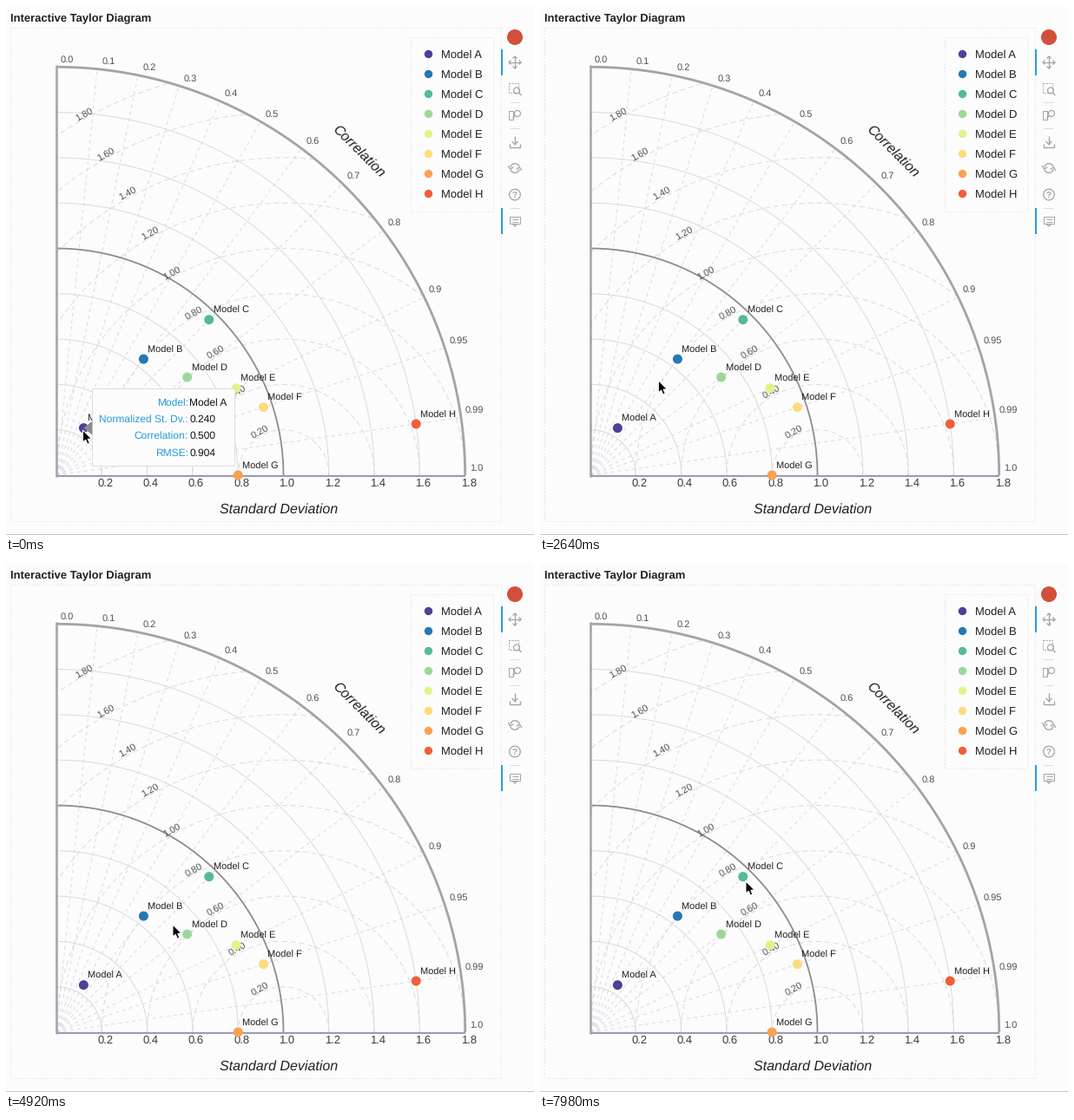
Write a matplotlib script that moves like this. It is 608x610 px and loops after 8000 ms.

```python
import numpy as np
import matplotlib.pyplot as plt
from matplotlib.animation import FuncAnimation
from matplotlib.patches import Circle, Polygon, Rectangle

W, H, DPI = 608, 610, 64
LOOP, STEP = 8000, 40
PX = 72 / DPI                      # points per pixel
X0, Y0, UNIT, RMAX = 58, 541, 261.5, 1.8
PAPER, INK, SOFT = "#fcfcfc", "#202020", "#505052"
AXIS, GRID, DASH = "#a3a3aa", "#dcdcd4", "#dadae8"
BORDER, BLUE, ICON = "#e6e6ec", "#2a9ad8", "#a3a6a8"

DEVIATIONS = (0.24, 0.64, 0.96, 0.72, 0.88, 0.96, 0.80, 1.60)
CORRELATIONS = (0.50, 0.60, 0.70, 0.80, 0.90, 0.95, 1.00, 0.99)

plt.rcParams.update({"font.family": "Liberation Sans", "text.hinting": "none",
                     "toolbar": "None"})
fig = plt.figure(figsize=(W / DPI, H / DPI), dpi=DPI, facecolor=PAPER)
ax = fig.add_axes([0, 0, 1, 1])
ax.set_xlim(0, W)
ax.set_ylim(H, 0)
ax.axis("off")


def polar(dev, corr):
    return X0 + dev * corr * UNIT, Y0 - dev * np.sqrt(1 - corr ** 2) * UNIT


def model_color(i):
    """Walk the spectral map from purple to red, skipping its pale centre."""
    rgb = plt.get_cmap("Spectral_r")((i + (i > 4)) / 10)[:3]
    return tuple(np.power(rgb, 1.18))


def line(x, y, color, width=1, dash=None):
    ax.plot(x, y, color=color, lw=width * PX, ls=(0, dash) if dash else "-",
            solid_capstyle="butt")


def text(x, y, s, size, color=INK, **kw):
    return ax.text(x, y, s, fontsize=size * PX, color=color, **kw)


def box(x, y, w, h, color, dash=None, **kw):
    return ax.add_patch(Rectangle((x, y), w, h, ec=color, lw=PX,
                                  ls=(0, dash) if dash else "-", **kw))


def dot(x, y, r, color, **kw):
    ax.add_patch(Circle((x, y), r, fc=color, lw=0, **kw))


def arc(x, y, r, color, width, start=0, end=360):
    a = np.radians(np.linspace(start, end, 150))
    line(x + r * np.cos(a), y - r * np.sin(a), color, width)


def draw_grid():
    for c in [*np.arange(10) / 10, 0.95, 0.99, 1.0]:
        x, y = polar(RMAX, c)
        if 0 < c < 1:
            line([X0, x], [Y0, y], DASH, dash=(4, 4))
        text(x + 5, y - 5.5, f"{c:.3g}" if 0 < c < 1 else f"{c:.1f}", 11, SOFT)

    a = np.linspace(0, np.pi, 400)
    tilt = np.radians(118.9)
    for i in range(1, 10):
        r = i / 5
        u, v = 1 + r * np.cos(a), r * np.sin(a)
        inside = (u >= 0) & (np.hypot(u, v) <= RMAX)
        line(X0 + u[inside] * UNIT, Y0 - v[inside] * UNIT, DASH, dash=(6, 4))
        d = r * UNIT + 4.5
        text(X0 + UNIT + d * np.cos(tilt), Y0 - d * np.sin(tilt), f"{r:.2f}", 11,
             SOFT, rotation=29, ha="center", va="center", rotation_mode="anchor")
        arc(X0, Y0, r * UNIT, GRID, 1, 0, 90)
        text(X0 + r * UNIT - 5, 553.7, f"{r:.1f}", 13, "#3c3c3e")

    arc(X0, Y0, UNIT, "#8e8e90", 1.8, 0, 90)
    arc(X0, Y0, RMAX * UNIT, AXIS, 2.8, 0, 90)
    line([X0, X0], [68, 543], AXIS, 2.5)
    line([X0, X0 + RMAX * UNIT], [542, 542], "#9e9cb2", 2.2)
    text(314.5, 584.5, "Standard Deviation", 16, style="italic", ha="center")
    text(406, 168, "Correlation", 16, style="italic", rotation=-45,
         ha="center", va="center")


def draw_models():
    box(466, 36, 95, 201, BORDER, (2, 2), fc=PAPER, zorder=3)
    for i, (dev, corr) in enumerate(zip(DEVIATIONS, CORRELATIONS)):
        name, color = "Model " + "ABCDEFGH"[i], model_color(i)
        x, y = polar(dev, corr)
        dot(x, y, 5.5, color, zorder=4)
        text(x + 5, y - 7.5, name, 11, zorder=4)
        row = 55.5 + 23 * i
        dot(486.5, row, 4.7, color, zorder=4)
        text(501, row + 4.7, name, 13, zorder=4)


def chevron(x, y, angle, size=3.5):
    a = np.radians(angle + np.array([135, 0, -135]))
    r = size * np.array([1, 0, 1])
    line(x + r * np.cos(a), y - r * np.sin(a), ICON, 1.3)


def lens(x, y, dx):
    arc(x, y, 3.5, ICON, 1.2)
    line([x + 2.5 * dx, x + 5.5 * dx], [y + 2.5, y + 5.5], ICON, 1.4)


def draw_toolbar():
    x = 586
    pan, zoom, wheel, save, reset, about, hover = np.linspace(65, 248, 7)
    dot(x, 36, 9, "#d2503a")
    for y in (pan, hover):
        line([571, 571], [y - 15, y + 15], BLUE, 2)
    for y in (zoom + 15, wheel + 15, about + 15):
        line([x - 6, x + 5], [y, y], "#dcdcdc")

    line([x - 7, x + 7], [pan, pan], ICON, 1.3)
    line([x, x], [pan - 7, pan + 7], ICON, 1.3)
    for k in range(4):
        a = k * np.pi / 2
        chevron(x + 7 * np.cos(a), pan - 7 * np.sin(a), 90 * k)
    box(x - 7, zoom - 7, 11, 11, ICON, (2, 1.3), fc="none")
    lens(x + 2, zoom + 2, 1)
    box(x - 7, wheel - 5, 5, 10, ICON, fc="none")
    lens(x + 3, wheel - 2, -1)
    line([x, x], [save - 7, save + 3], ICON, 1.4)
    chevron(x, save + 3, -90, 5)
    line([x - 6, x - 6, x + 6, x + 6], save + np.array([2, 6, 6, 2]), ICON, 1.4)
    for side in (0, 180):
        arc(x, reset, 5.3, ICON, 1.4, side + 20, side + 165)
        tip = -1 if side == 0 else 1
        chevron(x + 5.5 * tip, reset - tip, 90 * tip - 15, 4.5)
    arc(x, about, 6.3, ICON, 1.3)
    text(x, about + 3.7, "?", 10, ICON, ha="center", weight="bold")
    box(x - 6, hover - 5, 12, 8, ICON, fc="none")
    chevron(x, hover + 6, -90, 4)
    for y in (hover - 2.5, hover + 0.5):
        line([x - 3.5, x + 3.5], [y, y], ICON)


box(5, 25, 565, 569, BORDER, (2, 2), fc="none")
line([0, W], [609, 609], "#c4c4c4")
text(5, 18.5, "Interactive Taylor Diagram", 13, weight="bold")
draw_grid()
draw_models()
draw_toolbar()

# Tooltip and pointer
TIP_W, TIP_H = 163.5, 89
ROWS = np.linspace(-30, 27.5, 4) + 4.3
panel = box(0, 0, TIP_W, TIP_H, "#dedee0", fc=PAPER, zorder=6)
wedge = ax.add_patch(Polygon([(0, 0)] * 3, fc="#8c8c8e", lw=0, zorder=6))
labels = [text(0, 0, s + ":", 12, BLUE, ha="right", zorder=7)
          for s in ("Model", "Normalized St. Dv.", "Correlation", "RMSE")]
values = [text(0, 0, "", 12, "#101010", zorder=7) for _ in labels]
tooltip = [panel, wedge, *labels, *values]
ARROW = np.array([(0, 0), (0, 14), (3.2, 11.2), (5.4, 16.2), (7.8, 15.2),
                  (5.7, 10.3), (10, 10)])
pointer = ax.add_patch(Polygon(ARROW, fc="black", ec="white", lw=PX, zorder=9))

# The pointer rests on A, B and D, then heads for C.
ON_A, ON_B, ON_D = (88.5, 489), (155, 407), (206, 425)
STOPS = [(0, ON_A), (1640, ON_A), (1820, (107, 471)), (3160, ON_B),
         (4440, ON_B), (4920, (192, 417)), (5480, ON_D), (6940, ON_D),
         (7000, (212, 417)), (7960, (237, 367))]
TIMES = [t for t, _ in STOPS]
POINTS = np.array([p for _, p in STOPS])


def hovered(px, py):
    for i, (dev, corr) in enumerate(zip(DEVIATIONS, CORRELATIONS)):
        x, y = polar(dev, corr)
        if np.hypot(px - x, py - y) < 5.5:
            return i, x, y
    return None


def update(i):
    spot = [np.interp(i * STEP, TIMES, axis) for axis in POINTS.T]
    pointer.set_xy(ARROW + spot)
    hit = hovered(*spot)
    for artist in tooltip:
        artist.set_visible(hit is not None)
    if hit:
        k, x, y = hit
        left, dev, corr = x + 10, DEVIATIONS[k], CORRELATIONS[k]
        rmse = np.sqrt(1 + dev ** 2 - 2 * dev * corr)
        panel.set_xy((left, y - 45.5))
        wedge.set_xy([(x, y), (left, y - 8), (left, y + 8)])
        strings = ["Model " + "ABCDEFGH"[k], *(f"{v:.3f}" for v in (dev, corr, rmse))]
        for label, value, s, dy in zip(labels, values, strings, ROWS):
            label.set_position((left + 110.5, y + dy))
            value.set_position((left + 112, y + dy))
            value.set_text(s)
    return [*tooltip, pointer]


anim = FuncAnimation(fig, update, frames=LOOP // STEP, interval=STEP,
                     repeat=True, repeat_delay=0)
plt.show()
```
